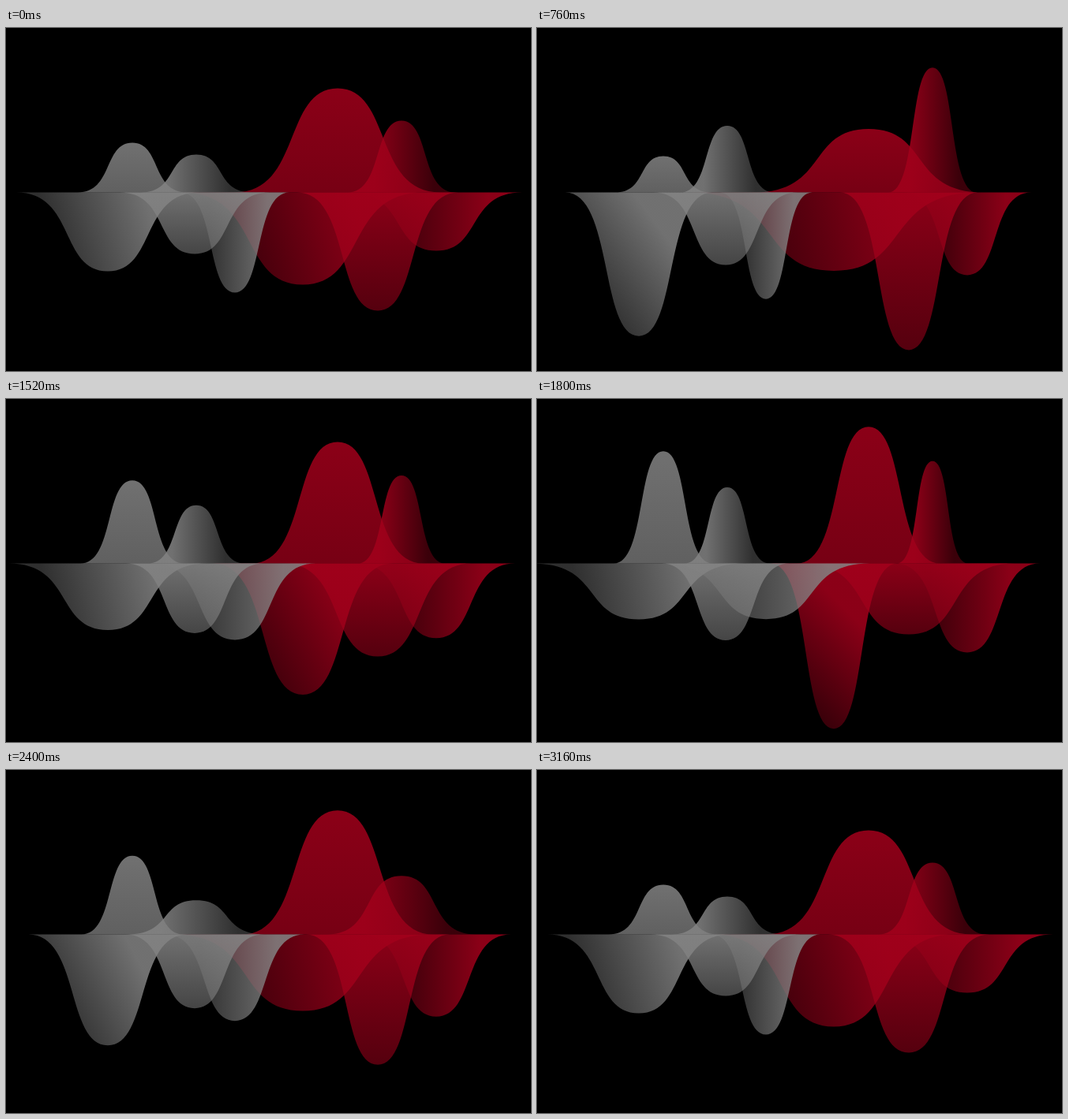
Animation, 665 px wide and 435 px high, one loop 3200 ms. Source, as an HTML page with a canvas:

```html
<!DOCTYPE html>
<html lang="en">
<head>
<meta charset="utf-8">
<title>Waves</title>
<style>
  html, body { margin: 0; width: 100%; height: 100%; overflow: hidden; background: #000; }
  canvas { display: block; }
</style>
</head>
<body>
<canvas id="stage" width="665" height="435"></canvas>
<script>
const ctx = document.getElementById('stage').getContext('2d');
const LOOP = 3200, STEP = 40, BASE_Y = 208.6;
const DIM = 0.36, LIT = 0.86;
const RED = '162,0,27', GREY = '131,131,131';

// Rest, peak, rest, peak ... ; every peak has its own shape.
const turns = [0, 600, 1200, 1880, 2240, 2680, 3160];

// Dim end to lit end of each gradient, in half widths and heights.
const shades = {
  rise: [0, -3, 0, 1],
  drop: [0, 1.5, 0, 0],
  toRight: [-0.5, 0, 0.6, 0],
  toLeft: [0.6, 0, -0.5, 0],
  slant: [-0.55, 0.8, 0.5, 0.4]
};

// Shapes are [half width, height]: at rest, then at the three peaks.
const wave = (color, dir, cx, shade, ...shapes) => ({ color, dir, cx, shade, shapes });
const waves = [
  wave(RED, 1, 376, 'slant', [153, 117], [194, 93], [71, 222], [183, 62]),
  wave(RED, -1, 501, 'toLeft', [68, 91], [52, 183], [42, 135], [140, 45]),
  wave(RED, -1, 420, 'rise', [130, 132], [152, 62], [86, 179], [107, 202]),
  wave(RED, 1, 545, 'toRight', [109, 74], [71, 116], [90, 118], [70, 157]),
  wave(RED, 1, 471, 'drop', [102, 150], [82, 218], [138, 82], [72, 192]),
  wave(GREY, 1, 129, 'slant', [116, 100], [85, 212], [136, 67], [74, 212]),
  wave(GREY, -1, 241, 'toLeft', [70, 48], [56, 98], [52, 103], [119, 35]),
  wave(GREY, -1, 160, 'rise', [69, 63], [58, 40], [62, 153], [56, 164]),
  wave(GREY, 1, 239, 'drop', [95, 78], [90, 97], [79, 100], [76, 121]),
  wave(GREY, 1, 290, 'toRight', [69, 127], [55, 138], [140, 63], [121, 79])
];

const mix = (a, b, k) => a + (b - a) * k;

// Which peak is near, and how far towards it.
function phase(t) {
  const i = turns.findIndex(turn => turn > t);
  if (i < 0) return [1, 0];
  const k = (t - turns[i - 1]) / (turns[i] - turns[i - 1]);
  return [Math.ceil(i / 2), i % 2 ? k : 1 - k];
}

function drawWave({ color, dir, cx, shade, shapes }, peak, k) {
  const [w, h] = shapes[0].map((v, i) => mix(v, shapes[peak][i], k));
  const px = x => cx + x * w;
  const py = y => BASE_Y + dir * y * h;
  const [x0, y0, x1, y1] = shades[shade];
  const fill = ctx.createLinearGradient(px(x0), py(y0), px(x1), py(y1));
  fill.addColorStop(0, `rgba(${color},${DIM})`);
  fill.addColorStop(1, `rgba(${color},${LIT})`);
  ctx.fillStyle = fill;
  ctx.beginPath();
  ctx.moveTo(px(-1), py(0));
  ctx.bezierCurveTo(px(-0.35), py(0), px(-0.53), py(1), px(0), py(1));
  ctx.bezierCurveTo(px(0.53), py(1), px(0.35), py(0), px(1), py(0));
  ctx.fill();
}

function draw(t) {
  const [peak, k] = phase(t);
  ctx.fillStyle = '#000';
  ctx.fillRect(0, 0, 665, 435);
  waves.forEach(w => drawWave(w, peak, k));
}

const start = performance.now();
function tick() {
  const t = (performance.now() - start) % LOOP;
  draw(Math.floor(t / STEP) * STEP);
  requestAnimationFrame(tick);
}
tick();
</script>
</body>
</html>
```
